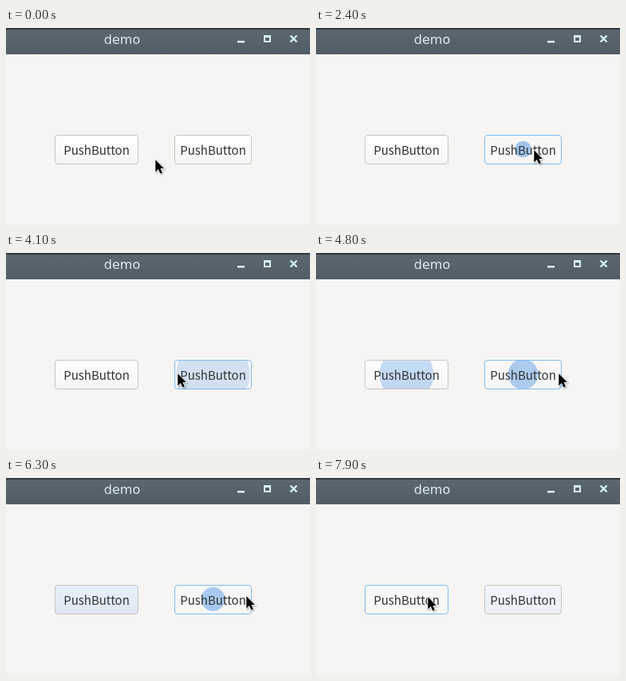
These frames come from a looping animation (381x247 px, 8000 ms). An HTML page with a canvas:

```html
<!DOCTYPE html>
<html>
<head>
<meta charset="utf-8">
<style>
html, body { margin: 0; height: 100%; overflow: hidden; background: #f6f5f4; }
canvas { display: block; }
</style>
</head>
<body>
<canvas id="stage"></canvas>
<script>
const W = 381, H = 247, LOOP = 8000, STEP = 100;
const RIPPLE = 650, SPEED = 0.115;
const PRESS = [3300, 3500];
const buttons = [
  { x: 61, y: 134, w: 105, h: 37 },
  { x: 211, y: 134, w: 97, h: 37 }
];

// Pointer path: time, x, y
const path = [
  [0, 187, 165], [220, 211, 154], [400, 250, 150], [600, 215, 150],
  [885, 166, 154], [1000, 162, 154], [1045, 211, 153], [1500, 314, 153],
  [2310, 308, 154], [2400, 273, 153], [2560, 166, 166], [2700, 115, 199],
  [2830, 90, 171], [3000, 87, 141], [3500, 87, 141], [3700, 211, 148],
  [3900, 250, 150], [4100, 215, 151], [4300, 192, 166], [4505, 166, 157],
  [4635, 211, 152], [4800, 304, 151], [5010, 166, 152], [5150, 140, 150],
  [5600, 192, 148], [5750, 192, 148], [5800, 166, 147], [6170, 211, 147],
  [6300, 301, 148], [6500, 298, 148], [6830, 166, 147], [7000, 110, 146],
  [7325, 211, 149], [7450, 240, 150], [7895, 166, 149], [7900, 140, 149],
  [LOOP, 140, 149]
];

function pointer(t) {
  const i = path.findIndex(k => k[0] > t);
  const [t0, x0, y0] = path[i - 1], [t1, x1, y1] = path[i];
  const p = (t - t0) / (t1 - t0);
  return { x: x0 + (x1 - x0) * p, y: y0 + (y1 - y0) * p };
}

const inside = (b, p) =>
  p.x >= b.x && p.x <= b.x + b.w && p.y >= b.y && p.y <= b.y + b.h;

// Each entry of the pointer starts a ripple
for (const b of buttons) {
  b.entries = [];
  let was = false;
  for (let t = 0; t < LOOP; t += 5) {
    const now = inside(b, pointer(t));
    if (now && !was) b.entries.push(t);
    was = now;
  }
}

const canvas = document.getElementById("stage");
const ratio = window.devicePixelRatio || 1;
canvas.width = W * ratio;
canvas.height = H * ratio;
canvas.style.width = W + "px";
canvas.style.height = H + "px";
const c = canvas.getContext("2d");
c.scale(ratio, ratio);
c.textAlign = "center";

function shade(y, h, top, bottom) {
  const g = c.createLinearGradient(0, y, 0, y + h);
  g.addColorStop(0, top);
  g.addColorStop(1, bottom);
  return g;
}

function rect(x, y, w, h, color) {
  c.fillStyle = color;
  c.fillRect(x, y, w, h);
}

function drawTitleBar() {
  rect(0, 0, W, 33, shade(0, 33, "#5c676f", "#515c66"));
  rect(0, 0, W, 2, "#30363a");
  c.fillStyle = "#d9eeee";
  c.font = "16px 'DejaVu Sans', sans-serif";
  c.fillText("demo", 145.5, 20);
  const icon = "#d8f3f3";
  rect(290, 16, 9, 2.5, icon);
  c.strokeStyle = icon;
  c.lineWidth = 2;
  c.strokeRect(324, 10, 7, 7);
  rect(323, 9, 9, 3, icon);
  c.lineWidth = 2.4;
  c.stroke(new Path2D("M356.5 9.5l8 8m0-8l-8 8"));
}

function drawButton(b, t, p) {
  const hover = inside(b, p);
  const pressed = hover && t >= PRESS[0] && t < PRESS[1];
  const cx = b.x + b.w / 2, cy = b.y + b.h / 2;
  const box = new Path2D();
  box.roundRect(b.x + 0.5, b.y + 0.5, b.w - 1, b.h - 1, 3.5);
  c.fillStyle = pressed ? shade(b.y, b.h, "#c4ddf5", "#7fc0fb")
    : hover ? "#f8f7f6" : shade(b.y, b.h, "#ffffff", "#f6f5f4");
  c.fill(box);

  if (!pressed) {
    c.save();
    c.clip(box);
    for (const start of b.entries) {
      const age = t - start;
      if (age < 0 || age > RIPPLE) continue;
      c.fillStyle = `rgba(82,148,226,${0.6 * (1 - age / RIPPLE)})`;
      c.beginPath();
      c.arc(cx, cy - 0.5, age * SPEED, 0, 7);
      c.fill();
    }
    c.restore();
  }

  c.strokeStyle = pressed ? "#b5bfca" : hover ? "#7dbcf0" : "#c8c5c2";
  c.lineWidth = 1;
  c.stroke(box);
  c.fillStyle = "#2e3436";
  c.font = "15px 'Noto Sans CJK SC', 'Noto Sans CJK JP', 'Noto Sans', sans-serif";
  c.fillText("PushButton", cx, 159);
}

const arrow = new Path2D("M0 0V15.2L3.6 11.8L6 17.2L8.6 16.1L6.2 10.8H10.6Z");

function drawPointer(p) {
  c.save();
  c.translate(Math.round(p.x) + 0.3, Math.round(p.y) + 0.3);
  c.shadowColor = "rgba(0,0,0,.35)";
  c.shadowBlur = 2;
  c.shadowOffsetX = c.shadowOffsetY = 1;
  c.strokeStyle = "#fff";
  c.lineWidth = 1.4;
  c.stroke(arrow);
  c.shadowColor = "transparent";
  c.fillStyle = "#000";
  c.fill(arrow);
  c.restore();
}

function draw(now) {
  const t = Math.floor(now % LOOP / STEP) * STEP;
  const p = pointer(t);
  rect(0, 0, W, H, "#f6f5f4");
  drawTitleBar();
  for (const b of buttons) drawButton(b, t, p);
  drawPointer(p);
}

const begin = performance.now();
function tick() {
  draw(performance.now() - begin);
  requestAnimationFrame(tick);
}
tick();
</script>
</body>
</html>
```
